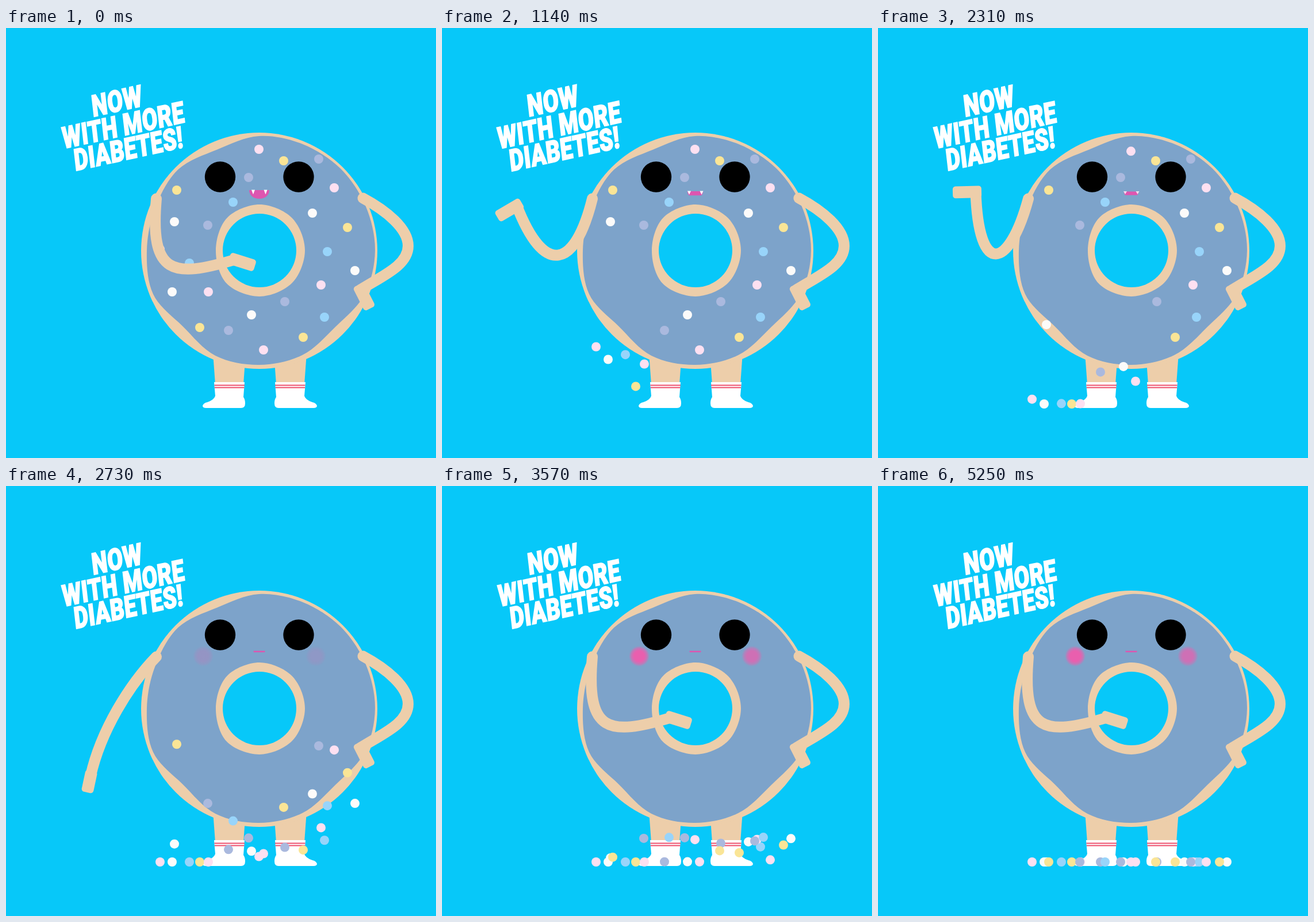
Write an HTML page that moves like this. It is 748 px wide and 748 px high and loops after 5430 ms.

```html
<!DOCTYPE html>
<html lang="en">
<head>
<meta charset="utf-8">
<title>Donut</title>
<style>
html, body { margin: 0; width: 100%; height: 100%; overflow: hidden; background: #07c8f9; }
svg { display: block; width: 100%; height: 100%; }
text { font: 900 52px Roboto, "Liberation Sans", sans-serif; letter-spacing: .6px; text-anchor: middle; fill: #fff; stroke: #fff; stroke-width: 2px; }
.limb { fill: none; stroke: #edceaa; stroke-width: 19; stroke-linecap: round; stroke-linejoin: round; }
.skin { fill: #edceaa; }
</style>
</head>
<body>
<svg viewBox="0 0 748 748">
  <defs>
    <radialGradient id="blush">
      <stop offset=".5" stop-color="#e95fae"/>
      <stop offset=".75" stop-color="#e95fae" stop-opacity=".65"/>
      <stop offset="1" stop-color="#e95fae" stop-opacity="0"/>
    </radialGradient>
    <g id="leg">
      <path class="skin" d="M360 565H417L413 620H364Z"/>
      <path fill="#fff" d="M362 616H415L413 642Q416 646 416 653Q416 661 409 661H348Q342 661 342 657Q344 652 350 651Q362 647 364 640Z"/>
      <path d="M362.500 621.500H415M362.800 625.500H414.500" stroke="#ee4f6c" stroke-width="1.800"/>
    </g>
  </defs>
  <rect width="748" height="748" fill="#07c8f9"/>
  <g id="slogan">
    <text transform="matrix(.735 -.16 .115 .99 195 145)">NOW</text>
    <text transform="matrix(.725 -.158 .115 .99 206 187)">WITH MORE</text>
    <text transform="matrix(.72 -.157 .115 .99 215 228)">DIABETES!</text>
  </g>
  <use href="#leg"/>
  <use href="#leg" transform="matrix(-1 0 0 1 883 0)"/>
  <circle class="skin" cx="440.500" cy="387.500" r="205.500"/>
  <path id="icing" fill="#7da3ca"/>
  <path id="rim" class="skin"/>
  <circle cx="441" cy="387" r="64" fill="#07c8f9"/>
  <g id="cheeks">
    <circle cx="343" cy="296" r="18" fill="url(#blush)"/>
    <circle cx="539" cy="296" r="18" fill="url(#blush)" opacity=".75"/>
  </g>
  <circle cx="372.500" cy="259" r="26.700"/>
  <circle cx="509" cy="259" r="26.700"/>
  <path id="mouth" fill="#de55b0"/>
  <path id="fangs" fill="#fff"/>
  <path class="limb" d="M621 296C662 318 699.500 349 699.500 379C699.500 413 655 431 617 455"/>
  <rect class="skin" x="-10" y="-10.500" width="46" height="21" rx="5" transform="translate(617 456) rotate(63)"/>
  <g id="sprinkles"></g>
  <path id="arm" class="limb"/>
  <rect id="hand" class="skin" x="-10" y="-10.500" height="21" rx="5"/>
</svg>
<script>
const LOOP = 5430, STEP = 30, GROUND = 654, BOUNCE = 0.66;
const $ = id => document.getElementById(id);
const set = (el, attrs) => { for (const k in attrs) el.setAttribute(k, attrs[k]); };
const lerp = (a, b, p) => a + (b - a) * p;
const ramp = (t, from, to) => Math.min(1, Math.max(0, (t - from) / (to - from)));
const smooth = p => p * p * (3 - 2 * p);

// Smooth closed outline from radii at even angles, clockwise from the right
function wobblyRing(cx, cy, radii) {
  const n = radii.length;
  const at = i => {
    const angle = i * 2 * Math.PI / n, r = radii[(i + n) % n];
    return [cx + r * Math.cos(angle), cy + r * Math.sin(angle)];
  };
  let d = `M${at(0)}`;
  for (let i = 0; i < n; i++) {
    const [a, b, c, e] = [at(i - 1), at(i), at(i + 1), at(i + 2)];
    d += `C${b.map((v, k) => v + (c[k] - a[k]) / 6)} ${c.map((v, k) => v - (e[k] - b[k]) / 6)} ${c}`;
  }
  return d + 'Z';
}
set($('icing'), { d: wobblyRing(440, 387, [202, 199, 188, 197, 199, 198, 187, 199, 195, 195, 199, 190, 199, 200, 201, 201]) });
set($('rim'), { d: wobblyRing(441, 387, [79, 80, 80, 81, 76, 80, 80, 80]) });

// Sprinkles let go in waves; each wave says when a drop lands and how slowly it bounces
const COLORS = { pink: '#fde0f1', yellow: '#fae596', lilac: '#aab9de', white: '#fcfbfa', blue: '#98d4fa' };
const quick = drop => 150 + 1.1 * drop;
const slow = drop => 360 + 0.5 * drop;
const waves = [
  { landing: () => 810, bounce: quick, yellow: [[337, 521]] },
  { landing: x => 960 + (x - 268) * 0.5, bounce: quick,
    pink: [[268, 385], [352, 459]], blue: [[319, 409]], white: [[289, 459]] },
  { landing: x => 1976 + (x - 293) * 0.75, bounce: slow,
    white: [[293, 337], [427, 499]], lilac: [[387, 526]], pink: [[448, 560]] },
  { landing: (x, drop) => 2735 + Math.abs(x - 440) * (drop / 400) ** 2, bounce: slow,
    pink: [[440, 211], [571, 278], [548, 447]],
    yellow: [[483, 231], [297, 282], [594, 347], [517, 538]],
    lilac: [[544, 228], [422, 260], [351, 343], [485, 476]],
    blue: [[395, 303], [559, 389], [554, 503]],
    white: [[533, 322], [607, 422]] }
];

function makeSprinkle(wave, color, [x, y]) {
  const el = document.createElementNS('http://www.w3.org/2000/svg', 'circle');
  set(el, { cx: x, r: 8, fill: COLORS[color] });
  const drop = GROUND - y;
  return { el, drop, landing: wave.landing(x, drop), scale: wave.bounce(drop) };
}
const sprinkles = waves.flatMap(wave => Object.keys(COLORS).flatMap(color =>
  (wave[color] || []).map(spot => makeSprinkle(wave, color, spot))));
sprinkles.sort((a, b) => a.drop - b.drop).forEach(s => $('sprinkles').append(s.el));

// Distance above the ground: an accelerating fall, then ever smaller parabolas
function altitude(t, { drop, landing, scale }) {
  if (t < landing) return drop * (1 - ramp(t, landing - 1.05 * drop, landing) ** 2);
  let u = (t - landing) / scale;
  for (let half = BOUNCE; half > 0.05; half *= BOUNCE) {
    if (u < 2 * half) return drop * half * half * (1 - (u / half - 1) ** 2);
    u -= 2 * half;
  }
  return 0;
}

// Arm poses: two elbow handles, wrist, fingertip
const hip = [[250, 430], [290, 435], [398, 403], [433, 414]];
const hang = [[255, 380], [232, 440], [215, 505], [206, 532]];
const reach = [[215, 335], [120, 335], [75, 330], [44, 330]];
const present = [[232, 416], [179, 435], [130, 309], [96, 329]];
const raise = [[228, 420], [175, 434], [170, 285], [130, 286]];
const droop = [[215, 345], [165, 425], [147, 505], [141, 533]];
const armKeys = [[230, hip], [780, hang], [930, reach], [1110, present], [1380, present], [1620, raise],
  [2460, raise], [2610, reach], [2730, droop], [2890, hang], [3150, hip]];

function armPose(t) {
  const i = armKeys.findIndex(key => key[0] > t);
  if (i < 1) return hip;
  const [[from, a], [to, b]] = [armKeys[i - 1], armKeys[i]];
  const p = smooth(ramp(t, from, to));
  return a.map((point, k) => point.map((v, j) => lerp(v, b[k][j], p)));
}

function drawArm(t) {
  const [upper, lower, wrist, tip] = armPose(t);
  const dx = tip[0] - wrist[0], dy = tip[1] - wrist[1];
  set($('arm'), { d: `M261.500 297C${upper} ${lower} ${wrist}` });
  set($('hand'), {
    width: Math.hypot(dx, dy) + 10,
    transform: `translate(${wrist}) rotate(${Math.atan2(dy, dx) * 180 / Math.PI})`
  });
}

// The grin narrows, then flattens to a line
function drawMouth(t) {
  const p = smooth(ramp(t, 840, 1080)), q = smooth(ramp(t, 2250, 2450));
  const mix = (open, small, line) => lerp(lerp(open, small, p), line, q);
  const half = mix(17.5, 13.5, 10), top = mix(282, 284, 286.8), bottom = mix(297, 291.3, 289.2);
  const corner = mix(17.5, 4, 0.5), x = 440.5, side = lerp(top, bottom, 0.6);
  set($('mouth'), { d: `M${x - half} ${top}H${x + half}
    C${x + half} ${side} ${x + half - corner * 0.45} ${bottom} ${x + half - corner} ${bottom}H${x - half + corner}
    C${x - half + corner * 0.45} ${bottom} ${x - half} ${side} ${x - half} ${top}Z` });
  const fang = mix(8, 6.5, 0);
  set($('fangs'), { d: [430, 451.5].map(f => `M${f - 3} ${top - 0.5}h6l-3 ${fang}Z`).join(''), opacity: 1 - q });
}

function draw(t) {
  for (const s of sprinkles) set(s.el, { cy: GROUND - altitude(t, s) });
  drawArm(t);
  drawMouth(t);
  set($('cheeks'), { opacity: ramp(t, 2640, 3060) });
  const pulse = 1 + 0.05 * Math.sin(Math.PI * ramp(t, 1050, 1650)) ** 2;
  set($('slogan'), { transform: `translate(205 173) scale(${pulse}) translate(-205 -173)` });
}

const start = performance.now();
function tick() {
  const t = (performance.now() - start) % LOOP;
  draw(Math.floor(t / STEP) * STEP);
  requestAnimationFrame(tick);
}
tick();
</script>
</body>
</html>
```
